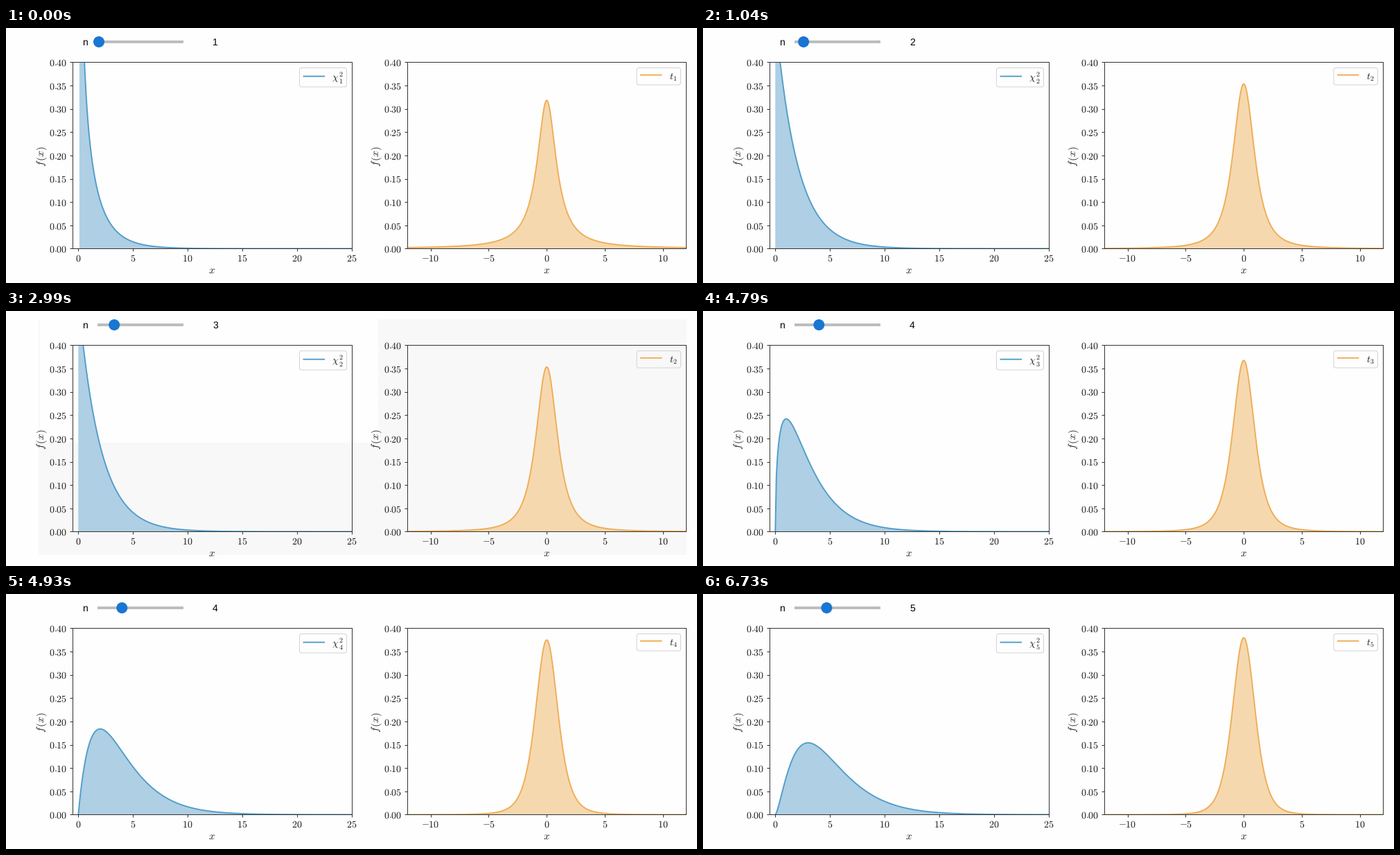
A matplotlib script for the animation above (8 s loop, 997 px wide and 368 px high).

```python
import math

import matplotlib.pyplot as plt
import numpy as np
from matplotlib.animation import FuncAnimation
from matplotlib.patches import Circle, FancyBboxPatch, Rectangle

W, H, DPI = 997, 368, 64
PX = 72 / DPI  # points per pixel
STEP, LOOP = 20, 8000
TOP, BOTTOM = 49.4, 318.4
BACK, TINT, INK = "#fefefe", "#f8f8f8", "#1c1c1c"
BLUE, BLUE_FILL = "#519dca", "#aecfe4"
ORANGE, ORANGE_FILL = "#f0ad56", "#f6d8af"

# start in ms, slider value, plotted n, tint stage
SCHEDULE = [
    (0, 1, 1, 0), (890, 2, 1, 0), (1040, 2, 2, 0),
    (2990, 3, 2, 1), (3140, 3, 3, 2),
    (4790, 4, 3, 0), (4930, 4, 4, 0),
    (6580, 5, 4, 0), (6730, 5, 5, 0),
]

plt.rcParams.update({"mathtext.fontset": "cm", "text.hinting": "none"})
fig = plt.figure(figsize=(W / DPI, H / DPI), dpi=DPI, facecolor=BACK)
stage = fig.add_axes([0, 0, 1, 1])
stage.set(xlim=(0, W), ylim=(H, 0))
stage.axis("off")


def box(x0, y0, x1, y1, color, z):
    return stage.add_patch(
        Rectangle((x0, y0), x1 - x0, y1 - y0, fc=color, lw=0, zorder=z))


def write(x, y, s, size=14, **kw):
    kw = {"ha": "center", "va": "baseline", "color": INK, "zorder": 5} | kw
    return stage.text(x, y, s, fontsize=size * PX, **kw)


def make_plot(left, right, xlim, xticks, color, fill):
    """Axes with frame, ticks and labels; returns its curve and area."""
    ax = fig.add_axes([left / W, 1 - BOTTOM / H,
                       (right - left) / W, (BOTTOM - TOP) / H], facecolor="none")
    yticks = np.arange(9) * 0.05
    ax.set(xlim=xlim, ylim=(0, 0.4), xticks=xticks, yticks=yticks)
    ax.tick_params(length=4 * PX, width=PX, color="#333333",
                   labelbottom=False, labelleft=False)
    for spine in ax.spines.values():
        spine.set(linewidth=PX, edgecolor="#333333")

    for v in yticks:
        y = BOTTOM - v / 0.4 * (BOTTOM - TOP)
        write(left - 8, y + 5.5, f"${v:.2f}$", ha="right")
    for v in xticks:
        x = left + (v - xlim[0]) / (xlim[1] - xlim[0]) * (right - left)
        write(x, 337, f"${v}$")
    write((left + right) / 2 - 0.5, 354, "$x$", 15)
    write(left - 45, 185, r"$f\hspace{0.12}(x)$", 15, rotation=90, va="center")

    area, = ax.fill([0, 0], [0, 0], fc=fill, lw=0, zorder=1)
    curve, = ax.plot([], [], color=color, lw=1.9 * PX, zorder=2)
    return curve, area


def make_legend(x0, x1, y1, line_y, color):
    stage.add_patch(FancyBboxPatch(
        (x0 + 3, 60.5), x1 - x0 - 6, y1 - 63.5, boxstyle="round,pad=3",
        fc="none", ec="#d3d3d3", lw=PX, zorder=4))
    stage.plot([x0 + 5, x0 + 36.5], [line_y, line_y], color=color, snap=False,
               lw=1.9 * PX, solid_capstyle="butt", zorder=5)


def chi2_pdf(x, n):
    return x ** (n / 2 - 1) * np.exp(-x / 2) / (2 ** (n / 2) * math.gamma(n / 2))


def t_pdf(x, n):
    scale = math.gamma((n + 1) / 2) / (math.sqrt(n * math.pi) * math.gamma(n / 2))
    return scale * (1 + x * x / n) ** (-(n + 1) / 2)


def set_curve(curve, area, x, y):
    curve.set_data(x, y)
    area.set_xy(np.column_stack([np.r_[x[0], x, x[-1]], np.r_[0, y, 0]]))


tints = [
    [box(47, 12, 982, 352, TINT, 0), box(49, 12, 537, 190, BACK, 1)],
    [box(49, 48, 982, 320, BACK, 2)],
]

chi_parts = make_plot(96.4, 498.9, (-0.5, 25), range(0, 26, 5), BLUE, BLUE_FILL)
t_parts = make_plot(579, 981.4, (-12, 12), range(-10, 11, 5), ORANGE, ORANGE_FILL)

make_legend(423.5, 491.5, 85, 69.7, BLUE)
write(470.5, 75.5, r"$\chi$", ha="left")
write(480, 70.5, "$2$", 10, ha="left")
chi_index = write(480, 79.5, "", 10, ha="left")
make_legend(910, 973.5, 82, 67.8, ORANGE)
t_name = write(957, 74.5, "", ha="left")

box(132, 18, 256, 22, "#bdbdbd", 4)
knob = stage.add_patch(Circle((134, 20), 8, fc="#1976d2", lw=0, zorder=5))
write(114.3, 25, "n", family="Liberation Sans", color="black")
value = write(302, 25, "", family="Liberation Sans", color="black")

CHI_X = np.linspace(0, 25, 250)
T_X = np.linspace(-12, 12, 401)


def draw(i):
    now = i * STEP
    _, slider, n, tint = [s for s in SCHEDULE if s[0] // STEP * STEP <= now][-1]
    knob.center = (134 + 11.1 * (slider - 1), 20)
    value.set_text(str(slider))
    x = CHI_X[1:] if n == 1 else CHI_X  # the density is infinite at zero
    set_curve(*chi_parts, x, chi2_pdf(x, n))
    set_curve(*t_parts, T_X, t_pdf(T_X, n))
    chi_index.set_text(f"${n}$")
    t_name.set_text(f"$t_{n}$")
    for level, patches in enumerate(tints, 1):
        for patch in patches:
            patch.set_visible(tint >= level)
    return []


anim = FuncAnimation(fig, draw, frames=LOOP // STEP, interval=STEP,
                     init_func=lambda: draw(0), repeat=True, repeat_delay=0)
plt.show()
```
